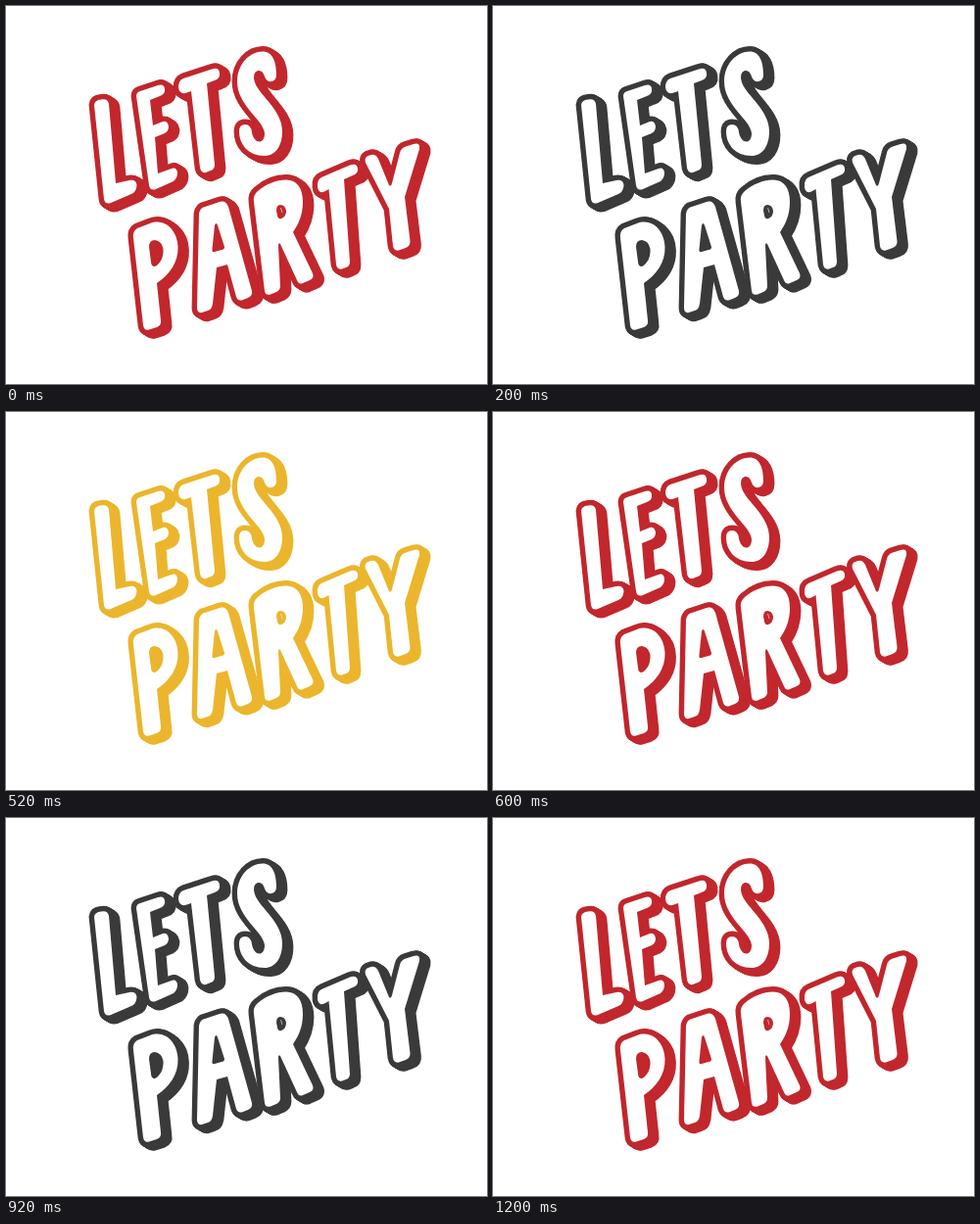
Animation of 491x386 px, one loop 1.4 s. Source, as an HTML page with a canvas:

```html
<!DOCTYPE html>
<html lang="en">
<head>
<meta charset="utf-8">
<title>Lets party</title>
<style>
  html, body { margin: 0; width: 100%; height: 100%; overflow: hidden; background: #fff; }
  canvas { display: block; }
</style>
</head>
<body>
<canvas id="stage" width="491" height="386" role="img" aria-label="LETS PARTY"></canvas>
<script>
const ctx = document.getElementById('stage').getContext('2d');
const COLORS = ['#c1272d', '#3a3a3b', '#ebb62d'];
const STEP = 200, LOOP = 1400;
const DEPTH = { x: 6, y: 3.6, steps: 8 };
const faces = [], holes = [];

const face = d => faces.push(new Path2D(d));
const hole = d => holes.push(new Path2D(d));

// L
face('M90 101Q90.500 96 97 95.500Q104 94 105 100L112 181L126 178Q133 177 133.500 183Q133 190 128 192L107 201Q101 203 100 197Z');
// E
face('M133 92Q133 88 137 87L155 81Q161 79 162 84Q163 90 157 92L147 96L150 122L160 118Q165 117 166 123Q166 128 162 130L152 134L155 171L169 166Q174 164 175 170Q175 176 171 179L153 187Q147 189 146 183Z');
// T
face('M176 83Q176 76 181 74L210 64.500Q217 62 218 68Q219 74 213 76L205 79L213 162Q213 167 209 168L204 170Q199 171 198 165L189 87L183 89Q177 90 176 83Z');
// S
face('M276 70Q276 76 271 77Q266 78 264 72Q262 65 257 66Q251 68 254 78C259 92 282 106 282 128C282 143 275 153 264 153C247 153 238 141 238 128Q238 121 244 121Q250 121 251 129C253 141 264 142 264 130C263 116 236 102 236 77C236 59 249 46.500 262 46.500C272 46.500 276 57 276 70Z');
// P
face('M130 237Q129 230 134 227L147 222C162 216 175 229 175.500 246C176 262 167 274 154 283L158 321Q159 326 154 328L146 330.500Q141 332 140 326Z');
hole('M146 246Q146 239 152 239Q159 240 160.500 248C161 256 158 263 152 266Q148 266 148 261Z');
// A
face('M197 212Q198 206 203 205L218 200Q224 198 227 205L251 291Q252 296 247 298L242 300Q237 302 235 297L226 264L215 267L211 304Q210 310 206 311L200 313Q195 314 195 308Z');
hole('M213 224Q214.500 220 216 224L223 246Q223 249 220 249L213 251Q210 252 210.500 248Z');
// R
face('M253 200Q252 193 257 189C265 182 276 177.500 286 177.500C297 177.500 303 186 303 200C303 213 299 222 293 231L313 273Q315 278 310 280L303 283Q299 285 297 280L280 243Q278 241 278 245L280 286Q280 290 276 292L270 294.500Q265 296 264 291Z');
hole('M276 209Q276 203 280 203Q285 203 286 209C286 213 284 216 281 217Q278 218 277 214Z');
// T
face('M318 185Q317 177 323 174.500L351 162.500Q358 160 359 165.500Q360 171 354 173L345 177L351 261Q351 266 347 267L343 268.500Q338 269.500 337 264L329.500 187L325 189.500Q319 192 318 185Z');
// Y
face('M367 160Q365 154 371 152.500Q377 150 380 156L391 183Q393 185 394 181L402 150Q403 145 408 143.500L416 141Q423 139 422 146L407 195L412.500 240Q413 245 408 247L401 249.500Q396 250.500 395 245L391 207Z');

function draw(color) {
  ctx.fillStyle = '#fff';
  ctx.fillRect(0, 0, 491, 386);
  ctx.fillStyle = ctx.strokeStyle = color;
  ctx.lineWidth = 10.8;
  ctx.lineJoin = 'round';
  for (let i = 0; i <= DEPTH.steps; i++) {
    const k = i / DEPTH.steps;
    ctx.save();
    ctx.translate(DEPTH.x * k, DEPTH.y * k);
    for (const p of faces) {
      ctx.fill(p);
      ctx.stroke(p);
    }
    ctx.restore();
  }
  ctx.fillStyle = '#fff';
  for (const p of faces) ctx.fill(p);
  ctx.fillStyle = color;
  for (const p of holes) ctx.fill(p);
  // small glint inside the R
  ctx.strokeStyle = '#fff';
  ctx.lineWidth = 0.6;
  ctx.beginPath();
  ctx.moveTo(280.5, 206);
  ctx.lineTo(282, 211);
  ctx.stroke();
}

const start = performance.now();
function tick() {
  const t = (performance.now() - start) % LOOP;
  draw(COLORS[Math.floor(t / STEP) % COLORS.length]);
  requestAnimationFrame(tick);
}
tick();
</script>
</body>
</html>
```
